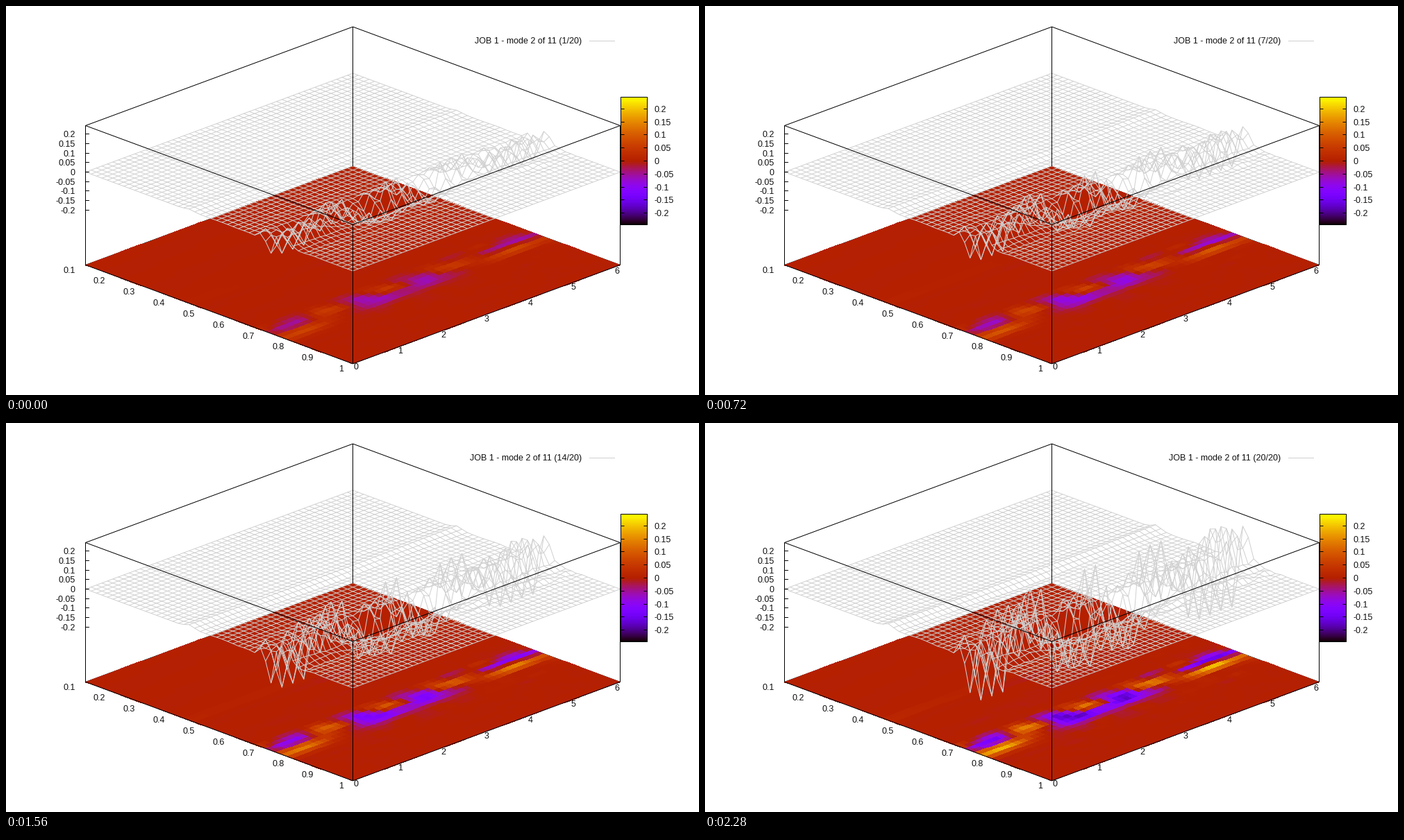
A matplotlib script that plays this animation: 998x561 px, repeating every 2400 ms.

```python
import numpy as np
import matplotlib.pyplot as plt
from matplotlib.animation import FuncAnimation
from matplotlib.collections import LineCollection

W, H, DPI = 998, 561, 100
PX = 72 / DPI
STEPS, N = 20, 50
GROWTH = 0.054
Z_MAX = 0.245
Z_PX = 273.5
FLOOR, ZERO, TOP = 373.5, 239.5, 172.5
GREY = "#d0d0d0"

plt.rcParams["font.family"] = "Liberation Sans"
fig = plt.figure(figsize=(W / DPI, H / DPI), dpi=DPI, facecolor="white")
ax = fig.add_axes([0, 0, 1, 1])
ax.axis("off")


def project(u, v, level):
    """Unit square to stage pixels, at a given height of the left corner."""
    return 114.5 + 385 * (u + v), level + 142.5 * (u - v)


def line(xs, ys, z=5, color="black"):
    ax.plot(xs, ys, color=color, lw=PX, zorder=z, solid_capstyle="butt",
            snap=False)


def label(x, y, s, ha="left"):
    return ax.text(x, y + 4.5, s, ha=ha, va="baseline", fontsize=12.5 * PX,
                   color="#101010", zorder=6)


def bell(x, mid, width):
    return np.exp(-0.5 * ((x - mid) / width) ** 2)


def wave(x):
    return np.cos(2 * np.pi * x)


def mode_shape(u, v):
    rng = np.random.default_rng(11)
    # Long front streak: high at both ends, a trough with two lows between.
    front = (.03 + .23 * wave(v + .03)) * (1 + .25 * wave(4 * (v - .11)))
    z = front * bell(u, .742 - .022 * v, .016)
    # Middle crest: alternating patches that lengthen towards the far end.
    beat = np.interp(v, [0, .1, .225, .455, .665, .88], [-.7, -.5, 0, 1, 2, 2.5])
    z += .21 * wave(beat) * bell(u, .692, .014)
    # Short patches behind it.
    z -= .08 * wave((v - .52) / .205) * bell(u, .66, .011)
    # Jagged part along the crest: alternates from node to node.
    flip = np.where(np.arange(N) % 2, 1, -1)
    z += flip * rng.uniform(.03, .14, u.shape) * bell(u, .695, .027)
    # Gentle ripples on both sides and the faint ridge further back.
    rough = rng.normal(0, 1, u.shape)
    rough = (np.roll(rough, 1, 1) + rough + np.roll(rough, -1, 1)) / 2
    z += rough * (.010 * bell(u, .78, .05) + .004 * bell(u, .62, .04))
    z += .02 * bell(u, .39, .015) * (1 - .4 * np.sin(np.pi * v))
    z -= .012 * bell(u, .43, .012) * bell(v, .5, .13)
    z += .003 * np.sin(40 * u + 5 * v) * bell(u, .52, .07)
    return np.clip(z, -Z_MAX, Z_MAX)


U, V = np.meshgrid(np.linspace(0, 1, N), np.linspace(0, 1, N), indexing="ij")
SHAPE = mode_shape(U, V)
MX, MY = project(U, V, ZERO)


def surface(z):
    pts = np.stack([MX, MY - Z_PX * z], axis=-1)
    return list(pts) + list(pts.transpose(1, 0, 2))


def cell_means(z):
    return (z[1:, 1:] + z[:-1, 1:] + z[1:, :-1] + z[:-1, :-1]) / 4


# Colour floor and wire mesh
floor = ax.pcolormesh(*project(U, V, FLOOR), cell_means(SHAPE), cmap="gnuplot",
                      vmin=-Z_MAX, vmax=Z_MAX, shading="flat",
                      antialiased=False, zorder=2)
wire = LineCollection([], colors=GREY, linewidths=PX, zorder=3)
ax.add_collection(wire)

# Box
LEFT, FRONT, RIGHT, BACK = (0, 0), (1, 0), (1, 1), (0, 1)


def edge(a, b, level, z=5):
    xs, ys = zip(project(*a, level), project(*b, level))
    line(xs, ys, z)


for a, b in ((LEFT, FRONT), (FRONT, RIGHT), (RIGHT, BACK), (BACK, LEFT)):
    edge(a, b, TOP)
    edge(a, b, FLOOR, 1 if BACK in (a, b) else 5)
for corner in (LEFT, FRONT, RIGHT, BACK):
    (x, y0), (_, y1) = project(*corner, TOP), project(*corner, FLOOR)
    line([x, x], [y0, y1])

# Axis labels
TICKS = [k / 20 for k in range(-4, 5)]
for t in TICKS:
    y = ZERO - round(Z_PX * t)
    line([114.5, 120], [y, y])
    label(100, y, f"{t:g}", "right")
for k in range(10):
    label(100 + 42.9 * k, 380 + 15.85 * k, f"{(k + 1) / 10:g}", "right")
for k in range(7):
    label(501 + 62.6 * k, 520 - 23.15 * k, str(k))

# Colour bar
X0, X1, Y0, Y1 = 885.5, 923.5, 131.5, 315.5
ax.imshow(np.linspace(1, 0, 184)[:, None], extent=(X0, X1, Y1, Y0),
          cmap="gnuplot", aspect="auto", interpolation="nearest", zorder=4)
line([X0, X1, X1, X0, X0], [Y0, Y0, Y1, Y1, Y0])
for t in TICKS:
    y = 223.5 - round(375 * t)
    line([X0, X0 + 5], [y, y])
    line([X1 - 5, X1], [y, y])
    label(934, y, f"{t:g}")

# Legend
line([840, 877], [50.5, 50.5], color=GREY)
title = label(829, 49.5, "", "right")
ax.set_xlim(0, W)
ax.set_ylim(H, 0)


def update(i):
    z = SHAPE * np.exp(GROWTH * (i + 1 - STEPS))
    floor.set_array(cell_means(z))
    wire.set_segments(surface(z))
    title.set_text(f"JOB 1 - mode 2 of 11 ({i + 1}/{STEPS})")
    return floor, wire, title


anim = FuncAnimation(fig, update, frames=STEPS, interval=120, repeat=True,
                     repeat_delay=0, init_func=lambda: update(0))
plt.show()
```
